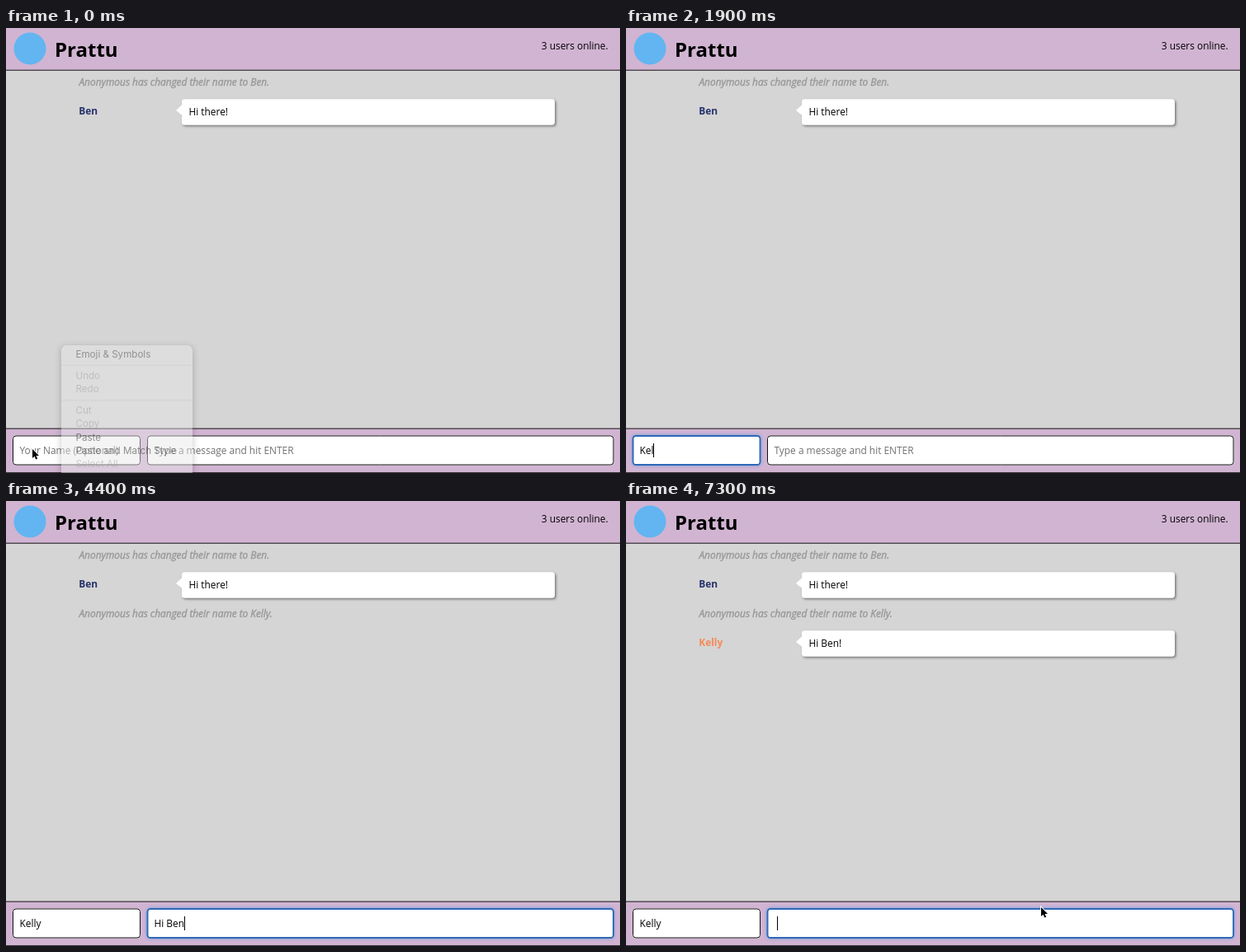
These frames come from a looping animation (744x540 px, 7400 ms). An HTML page with a canvas:

```html
<!DOCTYPE html>
<html lang="en">
<head>
<meta charset="utf-8">
<title>Group chat</title>
<style>
  html, body { margin: 0; width: 100%; height: 100%; overflow: hidden; background: #d5d5d5; }
  canvas { display: block; width: 744px; height: 540px; }
</style>
</head>
<body>
<canvas id="stage" width="744" height="540"></canvas>
<script>
const ctx = document.getElementById('stage').getContext('2d');
const LOOP = 7400, STEP = 100;
const SANS = '"Open Sans", sans-serif';
const BODY = `11.9px ${SANS}`;
const MAUVE = '#d1b4d2';
const USER = 'Kelly', FRIEND = 'Ben';
const NAME_BOX = { x: 8, y: 494.5, w: 155, h: 36 };
const TEXT_BOX = { x: 171, y: 494.5, w: 565.5, h: 36 };

// Times of each keystroke
const NAME_KEYS = [1500, 1700, 1850, 2000, 2200];
const TEXT_KEYS = [3700, 3850, 4000, 4100, 4200, 4350, 4700];
const REPLY = `Hi ${FRIEND}!`;
const FOCUS_NAME = 700, FOCUS_TEXT = 3300, SEND = 5100;

// Pointer positions: time, x, y
const PATH = [[0, 32, 511], [300, 33, 512], [700, 41, 513], [6200, 41, 513], [6500, 72, 506], [7300, 503, 493]];

function text(str, x, y, font, color) {
  ctx.font = font;
  ctx.fillStyle = color;
  ctx.fillText(str, x, y);
}

function rect(x, y, w, h, color) {
  ctx.fillStyle = color;
  ctx.fillRect(x, y, w, h);
}

function roundRect(x, y, w, h, r) {
  ctx.beginPath();
  ctx.roundRect(x, y, w, h, r);
}

function polygon(points) {
  ctx.beginPath();
  points.forEach(([x, y]) => ctx.lineTo(x, y));
  ctx.closePath();
}

function header() {
  rect(0, 0, 744, 51, MAUVE);
  rect(0, 50.7, 744, 1, '#161216');
  ctx.fillStyle = '#62b5f1';
  ctx.beginPath();
  ctx.arc(29, 25, 19.5, 0, Math.PI * 2);
  ctx.fill();
  text('Prattu', 59, 34.5, `bold 24px ${SANS}`, '#000');
  text('3 users online.', 648.8, 26, BODY, '#000');
}

function notice(name, y) {
  const str = `Anonymous has changed their name to ${name}.`;
  text(str, 88.5, y, `italic ${BODY}`, '#999');
  ctx.strokeStyle = '#999';
  ctx.lineWidth = 0.4;
  ctx.strokeText(str, 88.5, y);
}

function message(name, str, y, color) {
  text(name, 88.3, y + 19, `bold ${BODY}`, color);
  ctx.save();
  ctx.shadowColor = 'rgba(0,0,0,.45)';
  ctx.shadowOffsetX = ctx.shadowOffsetY = 1.5;
  ctx.shadowBlur = 3;
  ctx.fillStyle = '#fff';
  roundRect(213, y + 0.3, 452, 31.4, 3.5);
  ctx.fill();
  ctx.restore();
  ctx.fillStyle = '#fff';
  polygon([[206, y + 14], [213.5, y + 7], [213.5, y + 20]]);
  ctx.fill();
  text(str, 221.5, y + 20, BODY, '#000');
}

function field(box, value, hint, focused, caret) {
  const { x, y, w, h } = box;
  ctx.save();
  if (focused) {
    ctx.shadowColor = '#5b9ce8';
    ctx.shadowBlur = 4;
  }
  ctx.fillStyle = '#fff';
  roundRect(x, y, w, h, 4);
  ctx.fill();
  ctx.restore();
  roundRect(x + 0.5, y + 0.5, w - 1, h - 1, 3.5);
  ctx.strokeStyle = focused ? '#2f69b5' : '#111';
  ctx.lineWidth = focused ? 1.9 : 1;
  ctx.stroke();
  text(value || hint, x + 8.5, y + 22.5, BODY, value ? '#000' : '#707070');
  if (caret) {
    const indent = hint || value ? 0 : 3.5;
    const cx = Math.round(x + 8.5 + indent + ctx.measureText(value).width);
    rect(cx, y + 9.5, 1, 17, '#000');
  }
}

function menu(alpha) {
  if (alpha <= 0) return;
  const [x, y, w, h] = [67, 385, 159, 175];
  ctx.save();
  ctx.globalAlpha = alpha;

  // The shadow stays outside the translucent panel.
  ctx.save();
  ctx.beginPath();
  ctx.rect(0, 0, 744, 540);
  ctx.roundRect(x, y, w, h, 5);
  ctx.clip('evenodd');
  ctx.shadowColor = 'rgba(0,0,0,.5)';
  ctx.shadowBlur = 8;
  ctx.shadowOffsetY = 2;
  ctx.fillStyle = '#000';
  roundRect(x, y, w, h, 5);
  ctx.fill();
  ctx.restore();

  ctx.fillStyle = '#e6e6e6';
  roundRect(x, y, w, h, 5);
  ctx.fill();
  [408.5, 451].forEach(lineY => rect(x, lineY, w, 1.5, '#cacaca'));
  const items = [
    ['Emoji & Symbols', 396, '#333'], ['Undo', 422], ['Redo', 438], ['Cut', 464], ['Copy', 480],
    ['Paste', 497, '#111'], ['Paste and Match Style', 513, '#111'], ['Select All', 529]
  ];
  for (const [label, mid, color = '#999'] of items) {
    text(label, 84.5, mid + 4, '11.6px Inter, sans-serif', color);
  }
  ctx.restore();
}

function arrow(x, y) {
  const shape = [[0, 0], [0, 11], [2.5, 8.8], [4.2, 12.6], [6.2, 11.8], [4.5, 8], [8, 8]];
  polygon(shape.map(([dx, dy]) => [x + dx, y + dy]));
  ctx.strokeStyle = '#fff';
  ctx.lineWidth = 1.8;
  ctx.stroke();
  ctx.fillStyle = '#000';
  ctx.fill();
}

function beam(x, y) {
  ctx.beginPath();
  for (const side of [-3, 3]) {
    ctx.moveTo(x + side, y - 6.5);
    ctx.quadraticCurveTo(x, y - 6.5, x, y - 4);
    ctx.lineTo(x, y + 4);
    ctx.quadraticCurveTo(x, y + 6.5, x + side, y + 6.5);
  }
  ctx.moveTo(x - 1.5, y + 2.5);
  ctx.lineTo(x + 1.5, y + 2.5);
  ctx.strokeStyle = '#111';
  ctx.lineWidth = 1.1;
  ctx.stroke();
}

const inside = (b, x, y) => x >= b.x && x <= b.x + b.w && y >= b.y && y <= b.y + b.h;

function pointer(t) {
  // Hidden while typing
  if (t >= NAME_KEYS[0] && t < 6200) return;
  const i = Math.min(PATH.length - 2, PATH.findLastIndex(p => p[0] <= t));
  const [t0, x0, y0] = PATH[i], [t1, x1, y1] = PATH[i + 1];
  const u = (t - t0) / (t1 - t0), k = u * u * (3 - 2 * u);
  const x = x0 + (x1 - x0) * k, y = y0 + (y1 - y0) * k;
  const overField = inside(NAME_BOX, x, y) || inside(TEXT_BOX, x, y);
  if (t >= 200 && overField) beam(x, y);
  else arrow(x, y);
}

const typed = (str, keys, t) => str.slice(0, keys.filter(k => k <= t).length);

// The blink restarts on every focus change and key press.
function caretOn(t) {
  const resets = [FOCUS_NAME, ...NAME_KEYS, FOCUS_TEXT, ...TEXT_KEYS, SEND];
  const last = resets.filter(k => k <= t).pop();
  return last !== undefined && (t - last) % 1000 < 500;
}

function draw(t) {
  rect(0, 0, 744, 540, '#d5d5d5');
  header();
  notice(FRIEND, 70);
  message(FRIEND, 'Hi there!', 86, '#25326b');
  if (t >= FOCUS_TEXT) notice(USER, 141);
  if (t >= SEND) message(USER, REPLY, 157, '#f58a57');

  rect(0, 486, 744, 54, MAUVE);
  rect(0, 485.6, 744, 1, '#161216');
  rect(0, 539, 744, 1, '#3a323a');
  const inText = t >= FOCUS_TEXT, inName = t >= FOCUS_NAME && !inText;
  const caret = caretOn(t);
  const reply = t < SEND ? typed(REPLY, TEXT_KEYS, t) : '';
  field(NAME_BOX, typed(USER, NAME_KEYS, t), 'Your Name (Optional)', inName, inName && caret);
  field(TEXT_BOX, reply, t < SEND ? 'Type a message and hit ENTER' : '', inText, inText && caret);
  menu(0.45 - t / 300);
  pointer(t);
}

const start = performance.now();
function tick() {
  const t = (performance.now() - start) % LOOP;
  draw(Math.floor(t / STEP) * STEP);
  requestAnimationFrame(tick);
}
tick();
</script>
</body>
</html>
```
